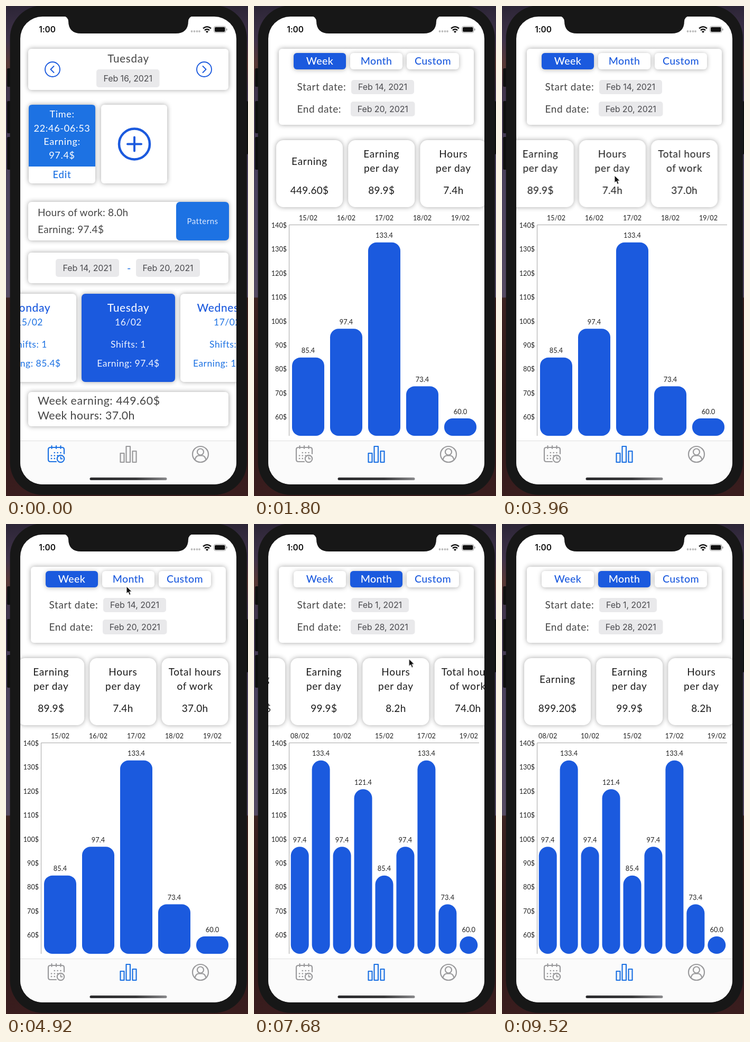
Write an HTML page that moves like this. It is 458 by 928 pixels and loops after 9.56 s.

```html
<!DOCTYPE html>
<html lang="en">
<head>
<meta charset="utf-8">
<title>Shift planner</title>
<style>
html, body { margin: 0; width: 100%; height: 100%; overflow: hidden; background: #161616; }
svg { display: block; width: 458px; height: 928px; }
text { font-family: Lato, "Open Sans", sans-serif; white-space: pre; }
.chip, .clock { font-family: Inter, Roboto, sans-serif; }
.shadow { filter: drop-shadow(0 0 5px rgba(0, 0, 0, .36)); }
.soft { filter: drop-shadow(0 1px 4px rgba(0, 0, 0, .3)); }
.medium { font-weight: 500; }
.line { fill: none; stroke-linecap: round; stroke-linejoin: round; }

.home, .stats, .week, .month { animation: 9.56s step-end infinite; }
.home { animation-name: home; }
.stats { animation-name: stats; }
.week { animation-name: week; }
.month { animation-name: month; }
.scroll { animation: scroll 9.56s ease-in-out infinite; }
.cursor { animation: cursor 9.56s ease-in-out infinite; }

@keyframes home { 0% { opacity: 1 } 10.46%, 100% { opacity: 0 } }
@keyframes stats { 0% { opacity: 0 } 10.46%, 100% { opacity: 1 } }
@keyframes week { 0% { opacity: 1 } 55.65%, 100% { opacity: 0 } }
@keyframes month { 0% { opacity: 0 } 55.65%, 100% { opacity: 1 } }
@keyframes scroll {
  0%, 32.43% { transform: translateX(0) }
  41.42%, 42.89% { transform: translateX(-168.5px) }
  47.07%, 77.4% { transform: translateX(-156px) }
  85.77%, 86.6% { transform: translateX(26px) }
  91.5%, 100% { transform: translateX(0) }
}
@keyframes cursor {
  0%, 24.06% { transform: translate(472px, 400px) }
  29.29%, 32.43% { transform: translate(395px, 330px) }
  41.42%, 44.35% { transform: translate(213px, 321px) }
  51.05%, 57% { transform: translate(228px, 118px) }
  70.08%, 71.65% { transform: translate(388px, 260px) }
  76.36%, 77.4% { transform: translate(240px, 257px) }
  85.77% { transform: translate(446px, 251px) }
  88.4%, 100% { transform: translate(472px, 250px) }
}
</style>
</head>
<body>
<svg id="stage" viewBox="0 0 458 928"></svg>
<script>
const BLUE = '#1b5ade', SKY = '#1d72e3', INK = '#464646', GRAY = '#9a9a9c';

const rect = (x, y, w, h, r, fill, cls = '') =>
  `<rect class="${cls}" x="${x}" y="${y}" width="${w}" height="${h}" rx="${r}" fill="${fill}"/>`;
const card = (x, y, w, h, r = 6, fill = '#fff') => rect(x, y, w, h, r, fill, 'shadow');
const text = (s, x, y, size, fill, { anchor = 'middle', gap = 0.5, cls = '' } = {}) =>
  `<text class="${cls}" x="${x}" y="${y}" font-size="${size}" fill="${fill}" text-anchor="${anchor}" letter-spacing="${gap}">${s}</text>`;
const left = (s, x, y, size, fill = INK, gap = 0.3) => text(s, x, y, size, fill, { anchor: 'start', gap });
const path = (d, color, width) => `<path class="line" d="${d}" stroke="${color}" stroke-width="${width}"/>`;
const ring = (x, y, r, color, width) => `<circle class="line" cx="${x}" cy="${y}" r="${r}" stroke="${color}" stroke-width="${width}"/>`;
const group = (cls, ...parts) => `<g class="${cls}">${parts.join('')}</g>`;
const chip = (s, x, y, w, h) => rect(x, y, w, h, 5, '#e9e9eb') +
  text(s, x + w / 2, y + h / 2 + 5.7, 16, '#4c4c50', { gap: -0.1, cls: 'chip' });

function backdrop() {
  return rect(0, 0, 458, 928, 0, 'url(#wall)') +
    rect(2, 118, 9, 35, 2, '#101010') + rect(2, 180, 9, 61, 2, '#101010') +
    rect(2, 248, 9, 62, 2, '#101010') + rect(450, 180, 8, 101, 2, '#101010') +
    rect(7.5, -1, 448.5, 927, 62, '#171717') + rect(27, 20, 409, 886, 42, '#fff');
}

function statusBar() {
  const dots = [351.5, 356.5, 361.5, 366].map(x => `<circle cx="${x}" cy="48" r="1.9" fill="#bcbcbc"/>`);
  return `<path d="M108 19h247q-10 1-10 11v-2q0 24-24 24H142q-24 0-24-24v2q0-10-10-11z" fill="#171717"/>` +
    text('1:00', 78, 50, 15.5, '#111', { gap: -0.1, cls: 'clock' }).replace('<text', '<text font-weight="600"') +
    dots.join('') +
    `<g fill="none" stroke="#111" stroke-width="2.4"><path d="M373 42.5q7.5-6.5 15 0M376 46q4.500-4 9 0"/></g>` +
    `<path d="M377.800 48.200q2.700-2 5.400 0l-2.700 2.800z" fill="#111"/>` +
    `<rect x="393.500" y="38.500" width="22.500" height="12" rx="3.500" fill="none" stroke="#999"/>` +
    rect(395, 40, 19.5, 9, 2, '#111') + rect(417, 42.5, 1.6, 4, 1, '#999');
}

function dayCard(i, name, date, earning, active) {
  const x = 143 + 187 * i, mid = x + 88.5, color = active ? '#eef3ff' : SKY;
  return card(x, 545, 177, 167, 7, active ? BLUE : '#fff') +
    text(name, mid, 579, 21, active ? color : BLUE, { gap: 0.6, cls: 'medium' }) +
    text(date, mid, 605, 17.5, color) + text('Shifts: 1', mid, 647, 17.5, color) +
    text(`Earning: ${earning}$`, mid, 683, 17.5, color);
}

function home() {
  const shift = ['Time:', '22:46-06:53', 'Earning:', '97.4$'];
  return group('home',
    card(42, 81, 379, 78),
    ring(88, 120, 14, BLUE, 1.9), path('M90.500 114l-6 6 6 6', BLUE, 1.9),
    ring(375, 120, 14, BLUE, 1.9), path('M372.500 114l6 6-6 6', BLUE, 1.9),
    text('Tuesday', 231.5, 107, 20.5, INK, { gap: 0.8 }),
    chip('Feb 16, 2021', 171, 120, 119.5, 34),

    card(43, 187, 126, 149),
    `<path d="M43 304V193q0-6 6-6h114q6 0 6 6v111z" fill="${SKY}"/>`,
    shift.map((s, i) => text(s, 106, [211, 238, 263, 289][i], 18, '#fff', { gap: 0.7 })).join(''),
    text('Edit', 106, 326, 18.5, SKY, { gap: 0.8, cls: 'medium' }),
    card(180, 187, 125, 149),
    ring(243, 261.5, 29, BLUE, 4.5), path('M230 261.500h26M243 248.500v26', BLUE, 4),

    card(42, 371, 379, 73),
    left('Hours of work: 8.0h', 60, 398, 19), left('Earning: 97.4$', 60, 430, 19),
    rect(322, 371, 100, 73, 7, SKY),
    text('Patterns', 372, 413, 15, '#dfeaff'),

    card(42, 467, 379, 58),
    chip('Feb 14, 2021', 94, 479, 120, 34), chip('Feb 20, 2021', 246, 479, 121, 34),
    text('-', 233, 503, 20, SKY),

    dayCard(-1, 'Monday', '15/02', '85.4'),
    dayCard(1, 'Wednesday', '17/02', '133.4'),
    dayCard(0, 'Tuesday', '16/02', '97.4', true),

    card(42, 731, 379, 65),
    left('Week earning: 449.60$', 60, 755, 21.3, INK, 0.6),
    left('Week hours: 37.0h', 60, 783, 21.3, INK, 0.4));
}

function buttons(selected) {
  return ['Week', 'Month', 'Custom'].map((s, i) => {
    const x = 75 + 107 * i, on = i === selected;
    return rect(x, 89, 99, 31, 6, on ? BLUE : '#fff', 'soft') +
      text(s, x + 49.5, 111, 19.5, on ? '#fff' : BLUE, { gap: 0.4, cls: 'medium' });
  }).join('');
}

function chart(values, dates, x0, step, width, radius, dateEvery) {
  const mid = i => x0 + i * step + width / 2;
  const bars = values.map((v, i) => {
    const top = 781 - (v - 60) * 4.54;
    return rect(x0 + i * step, top, width, 814 - top, radius, BLUE) +
      text(v.toFixed(1), mid(i), top - 8.5, 12.8, '#222', { gap: 0.1 });
  });
  const labels = dates.map((d, i) => text(d, mid(i * dateEvery), 406, 12.6, '#222', { gap: 0.05 }));
  return bars.join('') + labels.join('');
}

const summary = values => values.map((v, i) => text(v, 105 + 136.2 * i, 356, 19, '#1c1c1c', { gap: 0.3 })).join('');

function stats() {
  const titles = [['Earning'], ['Earning', 'per day'], ['Hours', 'per day'], ['Total hours', 'of work']];
  const cards = titles.map((lines, i) => {
    const x = 42 + 136.2 * i;
    return card(x, 254, 126, 127, 14) + lines.map((s, k) =>
      text(s, x + 63, (lines.length > 1 ? 287 : 301) + 27 * k, 19, '#1c1c1c', { gap: 0.7 })).join('');
  });
  const ticks = Array.from({ length: 9 }, (_, i) =>
    text(`${140 - 10 * i}$`, 62, 420 + 45.4 * i, 12.6, '#222', { anchor: 'end', gap: 0 }));

  return group('stats',
    card(47, 81, 369, 144),
    left('Start date:', 81.5, 160, 19, INK, 0.6), left('End date:', 81.5, 202, 19, INK, 0.6),
    chip('Feb 14, 2021', 184, 140, 119, 27).replace('<rect', '<rect data-range="week"'),
    group('scroll', ...cards,
      group('week', summary(['449.60$', '89.9$', '7.4h', '37.0h'])),
      group('month', summary(['899.20$', '99.9$', '8.2h', '74.0h']))),
    ticks.join(''),
    `<path d="M66.500 814V414.500H426" fill="none" stroke="#a6a6a6"/>`,
    group('week', buttons(0), chip('Feb 20, 2021', 183, 181, 121.5, 28),
      chart([85.4, 97.4, 133.4, 73.4, 60], ['15/02', '16/02', '17/02', '18/02', '19/02'], 72, 72, 61, 16, 1)),
    group('month', buttons(1),
      rect(183, 139, 122, 29, 0, '#fff'), chip('Feb 1, 2021', 184, 140, 109, 27),
      chip('Feb 28, 2021', 183, 181, 121.5, 28),
      chart([97.4, 133.4, 97.4, 121.4, 85.4, 97.4, 133.4, 73.4, 60],
        ['08/02', '10/02', '15/02', '17/02', '19/02'], 69.7, 39.95, 34, 17, 2)));
}

function calendarIcon(color) {
  let dots = '';
  for (let row = 0; row < 3; row++)
    for (let col = 0; col < 4; col++)
      if ((row || col) && !(row === 2 && col > 1)) dots += `M${86 + col * 5.8} ${846 + row * 5.5}h.1`;
  return path('M95 863H84q-4 0-4-4V840q0-4 4-4h22q4 0 4 4v8M86.500 833v5M95 833v5M103.500 833v5', color, 2.2) +
    path(dots, color, 2.7) +
    `<circle cx="103.500" cy="857.500" r="6.700" fill="#fbfbfb" stroke="${color}" stroke-width="2.200"/>` +
    path('M103.500 854v3.500h3', color, 1.8);
}

const barsIcon = color => path('M216.500 847h7v17h-7zM227.500 834h7.500v30h-7.500zM239.500 843h7v21h-7z', color, 2.2);

function tabBar() {
  return rect(27, 823, 409, 83, 0, '#fbfbfb') + rect(27, 823, 409, 1, 0, '#dedee0') +
    group('home', calendarIcon(SKY), barsIcon(GRAY)) +
    group('stats', calendarIcon(GRAY), barsIcon(SKY)) +
    ring(368, 849, 15, GRAY, 2.2) + ring(368, 844.5, 6, GRAY, 2.2) +
    path('M357.500 859q2-7 7-7.500h7q5 .5 7 7.500', GRAY, 2.2) +
    rect(158.5, 893, 146, 5, 2.5, 'url(#grip)');
}

const gradient = (id, dir, stops) => `<linearGradient id="${id}" ${dir}>` +
  stops.map(([at, color]) => `<stop offset="${at}" stop-color="${color}"/>`).join('') + '</linearGradient>';

document.getElementById('stage').innerHTML = `<defs>
  ${gradient('wall', 'x1="0" y1="0" x2="0" y2="1"', [
    [0, '#2c2536'], [0.07, '#40334a'], [0.12, '#583834'], [0.17, '#40344a'],
    [0.35, '#4a415c'], [0.594, '#554a62'], [0.596, '#3c2220'], [0.8, '#2e1918'], [1, '#3a1d1e']])}
  ${gradient('grip', '', [[0, '#2a2a2c'], [0.6, '#3a3a3c'], [1, '#8a8a8c']])}
  <clipPath id="screen"><rect x="27" y="20" width="409" height="886" rx="42"/></clipPath>
  </defs>` + backdrop() +
  `<g clip-path="url(#screen)">${home()}${stats()}${tabBar()}</g>` + statusBar() +
  group('cursor', '<path d="M0 0v14l3.200-3 2.300 5.500 2.600-1.100-2.300-5.300h4.500z" fill="#111" stroke="#fff" stroke-width="1"/>');
</script>
</body>
</html>
```
